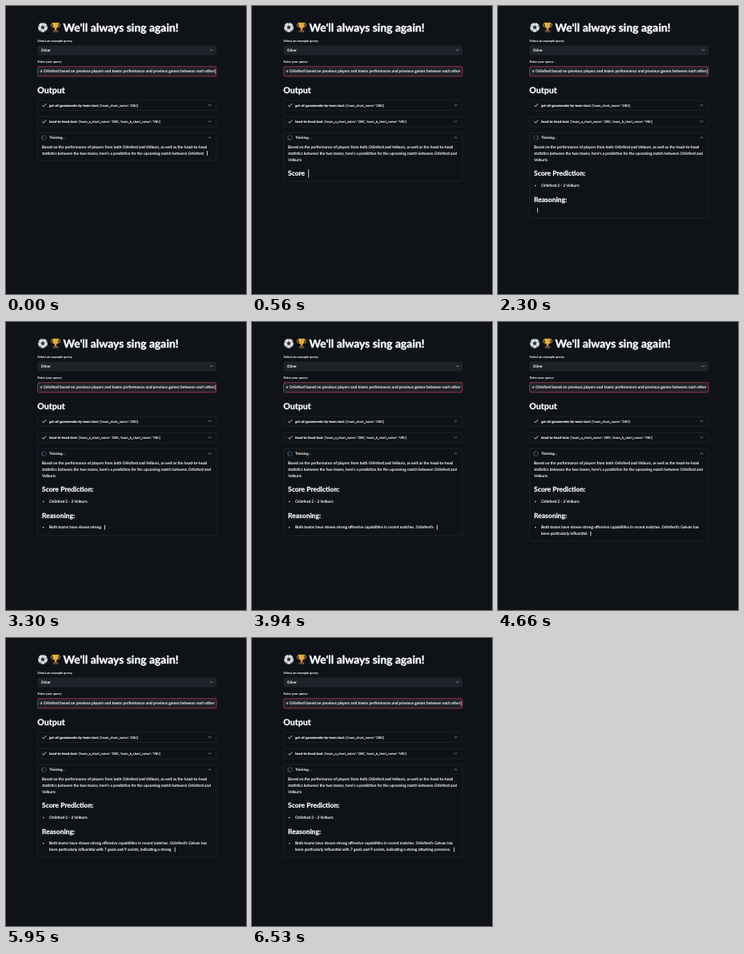
Recreate the animation shown at these times as an HTML page with a canvas. Size 300 by 360 pixels, loop 6600 ms.

```html
<!DOCTYPE html>
<html lang="en">
<head>
<meta charset="utf-8">
<title>Match prediction</title>
<style>
  html, body { margin: 0; width: 100%; height: 100%; overflow: hidden; background: #0f1318; }
  canvas { display: block; width: 300px; height: 360px; }
</style>
</head>
<body>
<canvas id="stage"></canvas>
<script>
const W = 300, H = 360, LOOP = 6600;
const PAGE = '#0f1318', INK = '#fafafa', FIELD = '#20222a';
const EDGE = 'rgba(250,250,250,0.09)', MUTED = 'rgba(250,250,250,0.7)';
const canvas = document.getElementById('stage');
const ctx = canvas.getContext('2d');
const dpr = window.devicePixelRatio || 1;
canvas.width = W * dpr;
canvas.height = H * dpr;

// Streamed answer: each word appears at the matching time (ms).
const answer = [
  { y: 177.7, bottom: 193, words: ['Based on the performance of players from both Orlinford and Velburn, as well as the head-to-head'], at: [0] },
  { y: 185.6, bottom: 193, words: ["statistics between the two teams, here's a prediction for the upcoming match between Orlinford", ' and'], at: [0, 140] },
  { y: 193.6, bottom: 201, words: ['Velburn', ':'], at: [270, 350] },
  { y: 212.3, bottom: 219, size: 8.5, weight: 700, words: ['Score', ' Prediction', ':'], at: [490, 630, 770] },
  { y: 226.2, bottom: 237, bullet: true, words: ['', 'Orlinford', ' 2', ' -', ' 2', ' Velburn'], at: [910, 1060, 1200, 1340, 1480, 1650] },
  { y: 244.6, bottom: 252, size: 8.5, weight: 700, words: ['Reason', 'ing', ':'], at: [1850, 1930, 2010] },
  { y: 258.3, bottom: 267, bullet: true,
    words: ['', 'Both', ' teams', ' have', ' shown', ' strong', ' offensive', ' capabilities', ' in', ' recent', ' matches.', " Orlinford's", ' Gelvan', ' has'],
    at: [2150, 2510, 2660, 2870, 3080, 3230, 3380, 3450, 3520, 3660, 3760, 3870, 4080, 4230] },
  { y: 266.2, bottom: 274, x: 54,
    words: ['been', ' particularly', ' influential', ' with', ' 7', ' goals', ' and', ' 9', ' assists,', ' indicating', ' a', ' strong', ' attacking', ' presence.'],
    at: [4370, 4520, 4660, 4800, 4940, 5080, 5220, 5360, 5520, 5660, 5800, 5950, 6100, 6300] }
];

// Draws at ten times the size, scaled down, so that advances stay unrounded;
// a thin outline thickens the strokes. Returns the end x.
function text(str, x, y, size, weight = 400, align = 'left') {
  ctx.save();
  ctx.translate(x, y);
  ctx.scale(0.1, 0.1);
  ctx.font = `${weight} ${size * 10}px Lato, "Open Sans", sans-serif`;
  ctx.textAlign = align;
  ctx.fillStyle = ctx.strokeStyle = INK;
  ctx.lineWidth = size * 0.3;
  ctx.fillText(str, 0, 0);
  ctx.strokeText(str, 0, 0);
  const width = ctx.measureText(str).width / 10;
  ctx.restore();
  return x + width;
}

function box(x, y, w, h, fill, stroke, line = 0.7) {
  ctx.beginPath();
  ctx.roundRect(x, y, w, h, 2);
  if (fill) { ctx.fillStyle = fill; ctx.fill(); }
  if (stroke) { ctx.strokeStyle = stroke; ctx.lineWidth = line; ctx.stroke(); }
}

function path(points, color, line) {
  ctx.beginPath();
  points.forEach(([x, y], i) => i ? ctx.lineTo(x, y) : ctx.moveTo(x, y));
  if (line) {
    ctx.strokeStyle = color;
    ctx.lineWidth = line;
    ctx.stroke();
  } else {
    ctx.fillStyle = color;
    ctx.fill();
  }
}

function disc(x, y, r, color) {
  ctx.beginPath();
  ctx.arc(x, y, r, 0, Math.PI * 2);
  ctx.fillStyle = color;
  ctx.fill();
}

function chevron(x, y, dir) {
  path([[x - 1.4, y - 0.7 * dir], [x, y + 0.7 * dir], [x + 1.4, y - 0.7 * dir]], MUTED, 0.7);
}

function polygon(cx, cy, r, turn) {
  return Array.from({ length: 5 }, (_, i) => {
    const a = turn + i * Math.PI * 0.4;
    return [cx + r * Math.cos(a), cy + r * Math.sin(a)];
  });
}

function ball(cx, cy, r) {
  ctx.save();
  disc(cx, cy, r, '#dcdddf');
  ctx.clip();
  const up = -Math.PI / 2;
  const inner = polygon(cx, cy, r * 0.4, up);
  const outer = polygon(cx, cy, r, up);
  inner.forEach((p, i) => path([p, outer[i]], '#a0a3a6', 0.5));
  path(inner, '#303437');
  outer.forEach(([x, y], i) => path(polygon(x, y, r * 0.26, up + Math.PI + i * Math.PI * 0.4), '#55595c'));
  ctx.restore();
}

function trophy(cx, top) {
  ctx.strokeStyle = '#c98d2a';
  ctx.lineWidth = 1;
  for (const side of [-1, 1]) {
    ctx.beginPath();
    ctx.ellipse(cx + side * 3.6, top + 3.2, 1.9, 2.4, 0, 0, Math.PI * 2);
    ctx.stroke();
  }
  ctx.beginPath();
  ctx.moveTo(cx - 3.8, top);
  ctx.lineTo(cx + 3.8, top);
  ctx.bezierCurveTo(cx + 3.8, top + 5, cx + 2.6, top + 6.8, cx + 0.8, top + 7.4);
  ctx.lineTo(cx + 1.4, top + 9.6);
  ctx.lineTo(cx - 1.4, top + 9.6);
  ctx.lineTo(cx - 0.8, top + 7.4);
  ctx.bezierCurveTo(cx - 2.6, top + 6.8, cx - 3.8, top + 5, cx - 3.8, top);
  ctx.fillStyle = '#e3a835';
  ctx.fill();
  ctx.fillStyle = '#f0cb68';
  ctx.fillRect(cx - 2.3, top + 0.9, 1.1, 4);
  ctx.fillStyle = '#7b4a2d';
  ctx.fillRect(cx - 3.3, top + 9.5, 6.6, 2.6);
}

function header() {
  ball(46, 26.7, 6);
  trophy(62, 20.7);
  text("We'll always sing again!", 71.5, 31.6, 13.9, 700);
}

function form(t) {
  text('Select an example query:', 39.5, 45.3, 4);
  box(39.5, 49.5, 223.5, 12, FIELD);
  text('Other', 43.8, 57, 4.6);
  chevron(256.8, 55.3, 1);

  text('Enter your query:', 39.5, 71.4, 4);
  box(39.5, 75.7, 223.5, 12.2, FIELD, '#b03a43', 0.8);
  ctx.save();
  ctx.beginPath();
  ctx.rect(42.6, 76, 220, 12);
  ctx.clip();
  text('for Orlinford based on previous players and teams performance and previous games between each other',
    260.6, 83.4, 4.85, 400, 'right');
  ctx.restore();
  if ((t + 190) % 1060 < 530) {
    ctx.fillStyle = INK;
    ctx.fillRect(261, 78.8, 0.6, 6);
  }
}

function toolRow(y, name, args) {
  box(39.5, y - 6.3, 223.5, 12.6, null, EDGE);
  path([[45.4, y], [46.9, y + 1.6], [50, y - 1.9]], INK, 0.8);
  const end = text(name, 54, y + 1.4, 4.15, 700);
  text(args, end + 1.5, y + 1.4, 4.15);
  chevron(254.6, y - 0.2, 1);
}

function spinner(t) {
  const start = Math.PI * 0.75 + t / 660 * Math.PI * 2;
  ctx.lineWidth = 0.8;
  ctx.strokeStyle = 'rgba(250,250,250,0.25)';
  ctx.beginPath();
  ctx.arc(47.5, 164.6, 2.8, 0, Math.PI * 2);
  ctx.stroke();
  ctx.strokeStyle = '#357fbd';
  ctx.beginPath();
  ctx.arc(47.5, 164.6, 2.8, start, start + Math.PI / 2);
  ctx.stroke();
}

function stream(t) {
  let cursor, bottom;
  for (const { x, y, size = 4.8, weight, bullet, words, at, bottom: edge } of answer) {
    const count = at.filter(ms => ms <= t).length;
    if (!count) break;
    const shown = words.slice(0, count).join('');
    const waiting = bullet && !shown;
    if (bullet && shown) disc(46.7, y - 1.6, 0.75, INK);
    const left = x || (bullet && shown ? 54 : 45);
    const end = text(shown, left, y, size, weight);
    cursor = { x: end + 4.2, y: y - size * 0.34 - (waiting ? 1.5 : 0), h: size * 1.2 };
    bottom = waiting ? edge - 2 : edge;
  }
  ctx.fillStyle = INK;
  ctx.fillRect(cursor.x, cursor.y - cursor.h / 2, 0.8, cursor.h);
  box(39.5, 158.3, 223.5, bottom - 158.3, null, EDGE);
}

function draw(t) {
  ctx.setTransform(dpr, 0, 0, dpr, 0, 0);
  ctx.textRendering = 'geometricPrecision';
  ctx.lineCap = ctx.lineJoin = 'round';
  ctx.fillStyle = PAGE;
  ctx.fillRect(0, 0, W, H);

  header();
  form(t);
  text('Output', 39.3, 108.8, 10.6, 700);
  toolRow(124.2, 'get-all-gameweeks-by-team-tool:', "{'team_short_name': 'ORL'}");
  toolRow(144.6, 'head-to-head-tool:', "{'team_a_short_name': 'ORL', 'team_b_short_name': 'VEL'}");
  spinner(t);
  text('Thinking...', 54, 166.1, 4.4);
  chevron(254.6, 164.4, -1);
  stream(t);
}

const began = performance.now();
function tick() {
  draw((performance.now() - began) % LOOP);
  requestAnimationFrame(tick);
}
tick();
</script>
</body>
</html>
```
